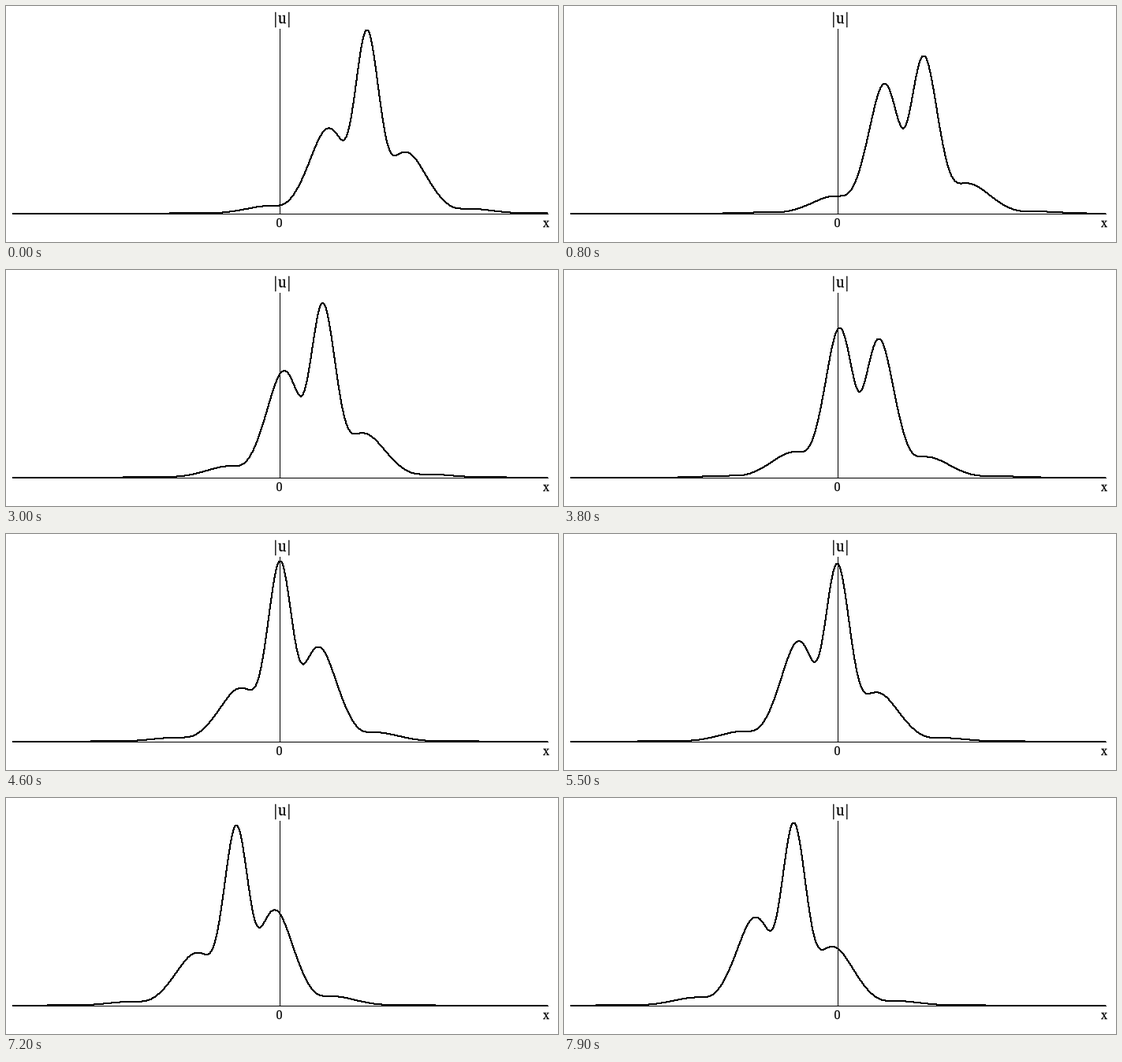
An HTML page for the animation above (8000 ms loop, 700 by 300 pixels).

```html
<!DOCTYPE html>
<html lang="en">
<head>
<meta charset="utf-8">
<title>Breather</title>
<style>
  html, body { margin: 0; width: 100%; height: 100%; overflow: hidden; background: #fff; }
  svg { display: block; }
  text {
    font-family: "Liberation Serif", "Times New Roman", serif; font-size: 16px;
    text-anchor: middle; stroke: #000; stroke-width: 0.3px;
  }
</style>
</head>
<body>
<svg width="700" height="300" viewBox="0 0 700 300">
  <path shape-rendering="crispEdges" d="M347 29h1v235h-1zM8 264h680v1h-680z"/>
  <path id="curve" shape-rendering="crispEdges"/>
  <text x="351" y="22" style="font-size:20px;letter-spacing:1.5px">|u|</text>
  <text x="346.5" y="281">0</text>
  <text x="685" y="281">x</text>
</svg>
<script>
const LOOP = 8000, STEP = 100;
const MID = 346.6, MID_TIME = 5000;    // the breather is symmetric about the axis here
const SPEED = 0.0212, PERIOD = 2615;   // px per ms, ms per breath
const PEAK = 235, BASE = 263.75;
const a = 0.0313, b = 0.0364;          // decay and wave number per px
const s = 1 / Math.cosh(1);            // depth of the modulation
const c2 = a * a / (a * a + b * b);
const K = Math.sqrt((1 - c2) * (1 - c2 * s * s)), m = c2 * s;

// |u|^2 is proportional to the second derivative of ln F,
// with F = K cosh 2y + 1 - m cos 2p
function density(x, phase) {
  const y = 2 * a * x, p = 2 * (b * x - phase);
  const F = K * Math.cosh(y) + 1 - m * Math.cos(p);
  const F1 = 2 * (a * K * Math.sinh(y) + b * m * Math.sin(p));
  const F2 = 4 * (a * a * K * Math.cosh(y) + b * b * m * Math.cos(p));
  return Math.max(0, (F2 * F - F1 * F1) / (F * F));
}
const scale = PEAK / Math.sqrt(density(0, 0));
const curve = document.getElementById("curve");

function draw(time) {
  const dt = time - MID_TIME;
  const center = MID - SPEED * dt, phase = Math.PI * dt / PERIOD;
  const row = x => Math.round(BASE - scale * Math.sqrt(density(x - center, phase))) - 1;
  let d = "", last = row(8);
  for (let x = 9; x <= 686; x++) {
    const next = row(x);
    const top = Math.min(last, next), h = Math.max(2, Math.abs(next - last) + 1);
    d += `M${x - 1} ${top}h2v${h}h-2z`;
    last = next;
  }
  curve.setAttribute("d", d);
}

function tick() {
  draw(Math.floor(performance.now() % LOOP / STEP) * STEP);
  requestAnimationFrame(tick);
}
tick();
</script>
</body>
</html>
```
